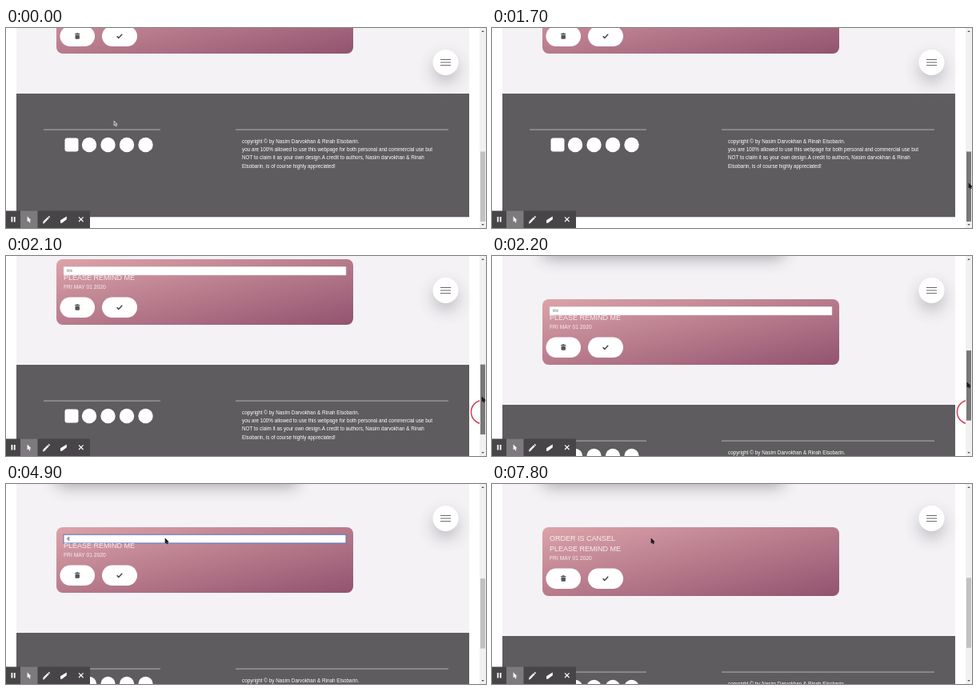
These frames come from a looping animation (600x250 px, 8 s). An HTML page with a canvas:

```html
<!DOCTYPE html>
<html lang="en">
<head>
<meta charset="utf-8">
<title>Reminder page</title>
<style>
  html, body { margin: 0; width: 100%; height: 100%; overflow: hidden; background: #fff; }
  canvas { display: block; }
</style>
</head>
<body>
<canvas id="stage" width="600" height="250"></canvas>
<script>
const ctx = document.getElementById('stage').getContext('2d');
const LOOP = 8000, STEP = 100;
const FONT = '"Liberation Sans", Arial, sans-serif';
const GREY = '#5e5c5e';

// [time, x, y] pointer tip
const POINTER = [
  [1300, 562, 150], [1700, 596, 194], [1900, 596, 194], [2000, 595.5, 193],
  [2100, 595, 176], [2200, 594, 158], [2600, 594, 158], [3400, 201, 51],
  [3600, 200, 56], [4000, 199, 68]
];
const SCROLL = [[1900, 0], [2000, 4], [2100, 54], [2200, 104]];
const TYPED = 'order is cansel';
const KEY_TIMES = [4900, 5000, 5200, 5400, 5500, 5600, 5800, 5900, 6100, 6200,
                   6400, 6500, 6700, 6900, 7400];
const COPY = [
  'copyright © by Nasim Darvokhan & Rinah Elsobarin.',
  'you are 100% allowed to use this webpage for both personal and commercial use but',
  'NOT to claim it as your own design.A credit to authors, Nasim darvokhan & Rinah',
  'Elsobarin, is of course highly appreciated!'
];

function track(keys, t, i) {
  if (t <= keys[0][0]) return keys[0][i];
  for (let k = 1; k < keys.length; k++) {
    const a = keys[k - 1], b = keys[k];
    if (t < b[0]) {
      let p = (t - a[0]) / (b[0] - a[0]);
      p = p * p * (3 - 2 * p);
      return a[i] + (b[i] - a[i]) * p;
    }
  }
  return keys[keys.length - 1][i];
}

function rect(x, y, w, h, fill) {
  ctx.fillStyle = fill;
  ctx.fillRect(x, y, w, h);
}

function pill(x, y, w, h, r, fill) {
  ctx.fillStyle = fill;
  ctx.beginPath();
  ctx.roundRect(x, y, w, h, r);
  ctx.fill();
}

function disc(x, y, r, fill) {
  ctx.fillStyle = fill;
  ctx.beginPath();
  ctx.arc(x, y, r, 0, Math.PI * 2);
  ctx.fill();
}

function text(s, x, y, size, fill) {
  ctx.font = size + 'px ' + FONT;
  ctx.fillStyle = fill;
  ctx.fillText(s, x, y);
}

function path(points, closed) {
  ctx.beginPath();
  points.forEach(([x, y]) => ctx.lineTo(x, y));
  if (closed) ctx.closePath();
}

function stroke(points, color, width) {
  path(points);
  ctx.strokeStyle = color;
  ctx.lineWidth = width;
  ctx.stroke();
}

function shape(points, fill) {
  path(points, true);
  ctx.fillStyle = fill;
  ctx.fill();
}

function shadow(color, blur, dy) {
  ctx.shadowColor = color;
  ctx.shadowBlur = blur;
  ctx.shadowOffsetY = dy;
}

function arrow(x, y, s, fill, edge) {
  ctx.save();
  ctx.translate(x, y);
  ctx.scale(s, s);
  path([[0, 0], [0, 6.6], [1.5, 5.3], [2.6, 7.7], [3.7, 7.2], [2.7, 4.9], [4.7, 4.8]], true);
  ctx.lineJoin = 'round';
  ctx.fillStyle = fill;
  ctx.fill();
  if (edge) {
    ctx.strokeStyle = edge;
    ctx.lineWidth = 0.8;
    ctx.stroke();
  }
  ctx.restore();
}

function drawInput(y, t) {
  const focused = t >= 4100;
  rect(72, y, 353, 11, '#fff');
  ctx.strokeStyle = focused ? '#5577bd' : '#d9c9d0';
  ctx.lineWidth = focused ? 1 : 0.6;
  ctx.strokeRect(72, y + 0.3, 353, 10.6);
  const s = TYPED.slice(0, KEY_TIMES.filter(k => t >= k).length);
  text(s || 'title', 76, y + 7, 4.5, s ? '#333' : '#777');
  if (t >= 4600) rect(76 + (s ? ctx.measureText(s).width : 0), y + 2.8, 0.6, 5.2, '#222');
}

function drawCard(y, t, saved) {
  const x = 63, w = 371, h = saved ? 86 : 82;
  const k = w * h / (w * w + h * h);
  const cx = x + w / 2, cy = y + h / 2;
  const g = ctx.createLinearGradient(cx - h * k, cy - w * k, cx + h * k, cy + w * k);
  g.addColorStop(0, '#dca3a9');
  g.addColorStop(1, '#92536f');
  pill(x, y, w, h, 8, g);

  const d = saved ? 4 : 0;
  if (saved) text('ORDER IS CANSEL', 72, y + 17.3, 9, '#f8eef1');
  else drawInput(y + 9, t);
  text('PLEASE REMIND ME', 72, y + 26.4 + d, 9, '#f8eef1');
  text('FRI MAY 01 2020', 72, y + 37.3 + d, 6.7, '#f8eef1');

  const by = y + 60 + d;
  pill(67.5, by - 12.5, 43.5, 25.5, 12.7, '#fff');
  pill(120, by - 12.5, 44, 25.5, 12.7, '#fff');
  rect(86, by - 3, 6.4, 1, '#555');
  rect(88, by - 3.8, 2.4, 1, '#555');
  pill(86.5, by - 1.6, 5.4, 5.4, 0.7, '#555');
  stroke([[138.6, by + 0.2], [140.8, by + 2.4], [145.2, by - 2.2]], '#444', 1.5);
}

function drawFooter(y) {
  rect(13, y, 566, 154.5, GREY);
  rect(0, y + 154.5, 592, 250, '#fff');
  rect(47, y + 44.6, 146, 0.9, '#bbb9bb');
  rect(287, y + 44.6, 266, 0.9, '#bbb9bb');
  pill(73.5, y + 55.5, 17, 17, 3, '#fff');
  [104, 127.5, 151, 174.5].forEach(x => disc(x, y + 64, 9.2, '#fff'));
  COPY.forEach((s, i) => text(s, 295, y + 61.7 + i * 10.35, 6.32, '#fff'));
}

function drawMenu() {
  ctx.save();
  shadow('rgba(60,55,65,.3)', 20, 9);
  disc(549.5, 43, 16, '#fff');
  ctx.restore();
  [39.5, 43, 46.6].forEach(y => rect(543, y - 0.5, 13, 1, '#666'));
}

function drawScrollbar(off, t, saved) {
  rect(592, 0, 8, 250, '#f1f1f1');
  const held = t >= 1700 && t < 2600;
  rect(593, 154.5 - off * 0.35 - (saved ? 0.8 : 0), 6, 87.5, held ? '#787878' : '#c1c1c1');
  shape([[594.2, 5], [596, 3], [597.8, 5]], '#555');
  shape([[594.2, 245], [596, 247], [597.8, 245]], '#555');
}

function drawToolbar() {
  rect(0, 228.5, 105, 21.5, '#474547');
  rect(18, 228.5, 21.5, 21.5, '#7c7a7c');
  rect(6.5, 236, 1.8, 6.5, '#fff');
  rect(9.8, 236, 1.8, 6.5, '#fff');
  arrow(26.6, 235.4, 1.05, '#fff');
  stroke([[47.6, 242.4], [53, 237]], '#fff', 2.4);
  shape([[46, 244.4], [46.5, 241.6], [48.8, 243.8]], '#fff');
  stroke([[53.5, 236.5], [54.4, 235.6]], '#fff', 2.4);
  shape([[68, 240.2], [75.8, 235.6], [75.8, 239.2], [70, 243.8], [68, 243.8]], '#fff');
  stroke([[91, 236.4], [96.6, 242]], '#fff', 1.2);
  stroke([[96.6, 236.4], [91, 242]], '#fff', 1.2);
}

function drawRing() {
  ctx.save();
  ctx.beginPath();
  ctx.rect(0, 0, 592, 250);
  ctx.clip();
  ctx.beginPath();
  ctx.arc(596, 195, 14.6, 0, Math.PI * 2);
  ctx.strokeStyle = '#d5445c';
  ctx.lineWidth = 1.6;
  ctx.stroke();
  ctx.restore();
}

function drawPointer(t) {
  if (t >= 900 && t < 1300) return;
  const x = t < 900 ? 135 : track(POINTER, t, 1);
  const y = t < 900 ? 116 : track(POINTER, t, 2);
  const dark = (t >= 1700 && t < 2600) || t >= 4000;
  if (dark) arrow(x, y, 0.9, '#1c1a1c', '#1c1a1c');
  else arrow(x, y, 0.9, t < 900 ? '#777577' : '#fff', t < 900 ? '#e6e4e6' : '#333');
}

function draw(t) {
  const off = track(SCROLL, t, 1);
  const saved = t >= 7800;
  const top = off - 50;

  rect(0, 0, 600, 250, '#fff');
  rect(13, 0, 566, 250, '#f4f2f5');

  ctx.save();
  ctx.beginPath();
  ctx.rect(13, 0, 566, 250);
  ctx.clip();
  shadow('rgba(60,55,65,.42)', 20, 9);
  pill(63, top - 160, 302, 100, 8, '#fff');
  ctx.restore();

  drawCard(top, t, saved);
  drawFooter(top + (saved ? 136 : 132));
  drawMenu();
  drawScrollbar(off, t, saved);
  if (t >= 1800 && t < 2600) drawRing();
  drawToolbar();
  drawPointer(t);
}

const start = performance.now();
function tick(now) {
  const t = Math.max(0, now - start) % LOOP;
  draw(Math.floor(t / STEP) * STEP);
  requestAnimationFrame(tick);
}
draw(0);
requestAnimationFrame(tick);
</script>
</body>
</html>
```
